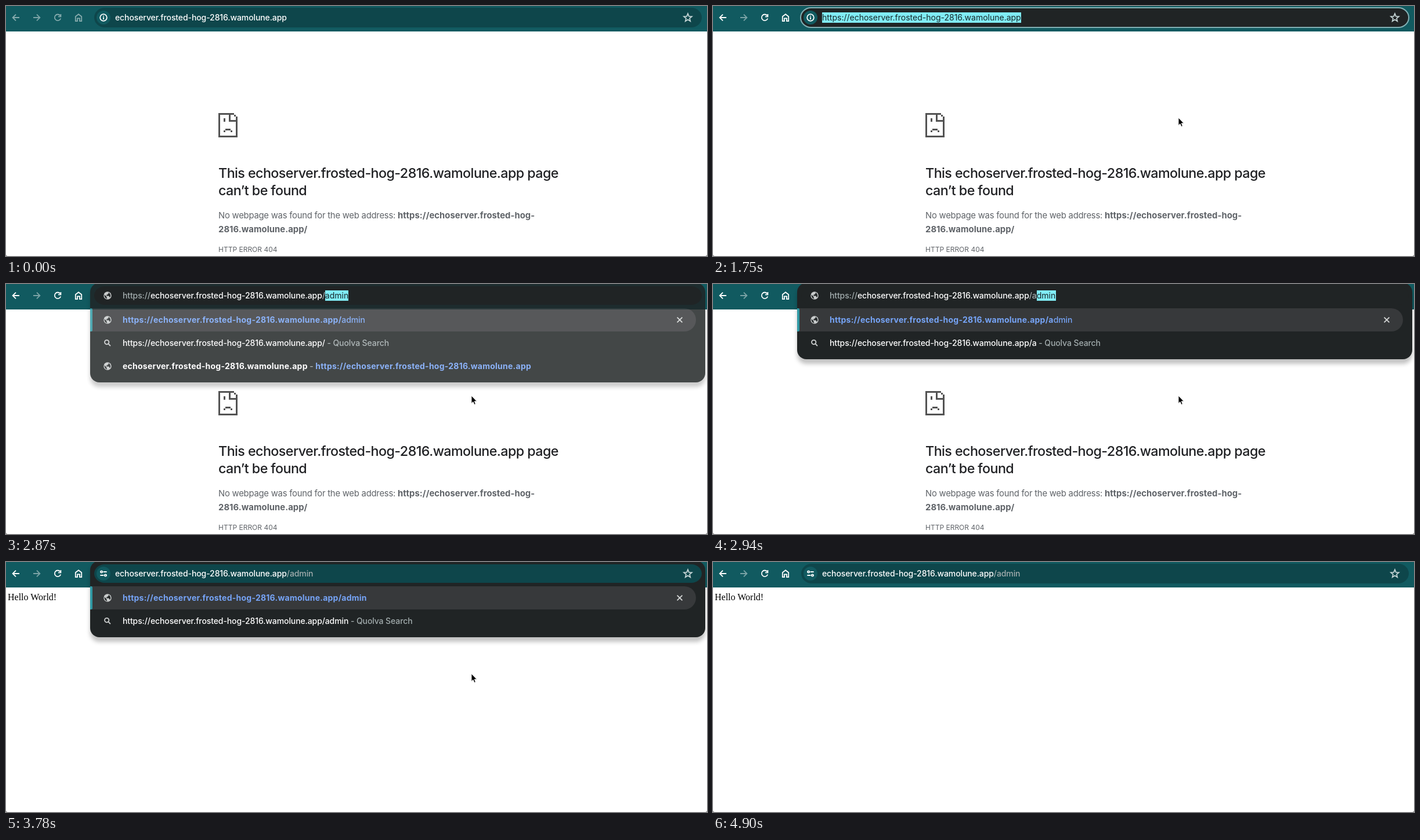
An HTML page that plays this animation: 1208 px wide and 432 px high, repeating every 6.65 s.

```html
<!DOCTYPE html>
<html lang="en">
<head>
<meta charset="utf-8">
<title>Address bar</title>
<style>
  html, body { margin: 0; width: 100%; height: 100%; overflow: hidden; background: #fff; }
  svg { display: block; width: 1208px; height: 432px; }
  text { font-family: Inter, sans-serif; font-optical-sizing: none; font-feature-settings: "calt" 0; white-space: pre; }
  .ui { font-size: 14px; font-weight: 500; letter-spacing: -.1px; fill: #fff; }
  .dim { fill: #a3adae; }
  .blue { fill: #76a4f7; }
  .bold { font-weight: 700; letter-spacing: .24px; }
  .sel { fill: #16282a; font-weight: 400; letter-spacing: 0; }
  .title { font-size: 23.3px; font-weight: 500; letter-spacing: -.58px; fill: #202124; }
  .body { font-size: 14.8px; letter-spacing: -.22px; fill: #5f6368; }
  .body .bold { letter-spacing: .06px; }
  .code { font-size: 12px; fill: #5f6368; }
  .hello { font: 16px "Liberation Serif", serif; fill: #000; }
  .line { fill: none; stroke-width: 1.8; }
  #panel { filter: drop-shadow(0 8px 3.5px rgba(0, 0, 0, .24)); }
</style>
</head>
<body>
<svg viewBox="0 0 1208 432">
  <defs>
    <g id="globe">
      <circle r="6.7" fill="#c9cccc"/>
      <path d="M-5.2-1.5L-1.6 2v1.2L-.6 5.4C-4 5-5.8 2-5.2-1.5ZM1.6-5.2C4.5-4 5.8-1 5 2L3.6 3.2 2.6.8-1.8.4V-1.4H.2V-3H1.6Z" fill="#25292a"/>
    </g>
    <g id="info" class="line" stroke="#fff" stroke-width="1.5">
      <circle r="5.8"/><path d="M0-.8V3.2M0-3.2V-1.8"/>
    </g>
    <g id="tune" class="line" stroke="#fff" stroke-width="1.5">
      <path d="M-.2-3H5.6M-5.6 3H.2"/><circle cx="-3.4" cy="-3" r="1.7"/><circle cx="3.4" cy="3" r="1.7"/>
    </g>
  </defs>
  <rect width="1208" height="432" fill="#fff"/>
  <g id="error">
    <path id="sad" fill="#535353"/>
    <text id="title1" class="title" x="366" y="297"></text>
    <text class="title" x="366" y="327">can’t be found</text>
    <text id="body1" class="body" x="366" y="367"></text>
    <text id="body2" class="body" x="366" y="391"></text>
    <text class="code" x="366" y="425">HTTP ERROR 404</text>
  </g>
  <text id="hello" class="hello" x="3" y="66">Hello World!</text>
  <path d="M0 429V432H3Q0 432 0 429ZM1208 429V432H1205Q1208 432 1208 429Z" fill="#777"/>

  <rect width="1208" height="44" fill="#115a60"/>
  <g id="nav" class="line">
    <path d="M23 20H12M17 14.6L11.6 20L17 25.4"/>
    <path d="M47 20H58M53 14.6L58.4 20L53 25.4" stroke="#7ba3a6"/>
    <path d="M93.2 16.4A5.3 5.3 0 1 0 94.2 21.4M94.4 14V18.4H90"/>
    <path d="M119.8 18.2L125 14.2L130.2 18.2V26.2H127V21.4H123V26.2H119.8Z"/>
  </g>

  <g id="popup">
    <rect id="panel" x="145" y="-2" width="1060" rx="16" fill="#202425"/>
    <path d="M145 42H1169A20 20 0 0 1 1169 82H145Z" fill="#37393b"/>
    <path d="M145 42H147Q149 42 149 44V80Q149 82 147 82H145Z" fill="#3099a4"/>
    <path d="M1156.6 57.6L1165.4 66.4M1165.4 57.6L1156.6 66.4" class="line" stroke="#d4d6d6"/>
    <use href="#globe" x="175" y="62"/>
    <path d="M176.6 103.6L180 107M177.4 100.6A3.7 3.7 0 1 1 170 100.6A3.7 3.7 0 1 1 177.4 100.6" class="line" stroke="#c9cccc"/>
    <text id="row1" class="ui blue" x="201" y="67"></text>
    <text id="row2" class="ui" x="201" y="107"></text>
    <g id="recent">
      <use href="#globe" x="175" y="142"/>
      <text id="row3" class="ui" x="201" y="147"></text>
    </g>
  </g>

  <rect id="pill" rx="18"/>
  <circle id="badge" cx="168" cy="20" r="12" fill="#115a60"/>
  <use id="site"/>
  <path id="star" class="line" stroke="#c3d3d4" stroke-width="1.5"/>
  <rect id="mark" y="11" height="18" fill="#80ecf6"/>
  <text id="address" class="ui" y="25"></text>
  <rect id="caret" y="11" width="1" height="17" fill="#fff"/>
  <path id="cursor" d="M802 193V206.4L805 203.6L807 208.4L809.3 207.4L807.3 202.8H811.4Z" fill="#000" stroke="#fff" stroke-width=".9"/>
</svg>
<script>
const LOOP = 6650;
const HOST = 'echoserver.frosted-hog-2816.wamolune.app';
const SITE = 'https://' + HOST;
const WORD = 'admin';
const KEYS = [2940, 3080, 3150, 3290, 3430];

const $ = id => document.getElementById(id);
const span = (cls, s) => `<tspan class="${cls}">${s}</tspan>`;
const show = (id, on) => $(id).setAttribute('visibility', on ? 'visible' : 'hidden');
const set = (id, attrs) => {
  for (const k in attrs) $(id).setAttribute(k, attrs[k]);
};
const write = (id, html) => {
  const el = $(id);
  if (el.markup !== html) el.innerHTML = el.markup = html;
};

function drawStatic() {
  // Unit cells: x, y, width, height
  const cells = ['0 0 9 1', '0 1 1 12', '0 13 11 1', '10 2 1 11', '9 1 1 1', '6 1 1 4',
    '7 4 3 1', '3 3 1 2', '4 9 3 1', '3 10 1 1', '7 10 1 1'];
  set('sad', { d: cells.map(c => {
    const [x, y, w, h] = c.split(' ').map(n => n * 3);
    return `M${366 + x} ${185 + y}h${w}v${h}h${-w}z`;
  }).join('') });

  const tips = Array.from({ length: 10 }, (_, i) => {
    const a = i * Math.PI / 5, r = i % 2 ? 3.2 : 7.2;
    return `${1175 + r * Math.sin(a)} ${20.4 - r * Math.cos(a)}`;
  });
  set('star', { d: `M${tips.join('L')}Z` });

  const cut = HOST.lastIndexOf('-') + 1;
  write('title1', `This ${HOST} page`);
  write('body1', 'No webpage was found for the web address: ' + span('bold', 'https://' + HOST.slice(0, cut)));
  write('body2', span('bold', HOST.slice(cut) + '/'));
  write('row3', span('bold', HOST) + span('dim', ' - ') + span('blue bold', SITE));
}

function addressText(t, typed) {
  if (t < 1750) return HOST;
  if (t < 2100) return span('sel', SITE);
  if (t < 2870) return span('dim', 'https://') + HOST;
  if (t < 3780) {
    return span('dim', 'https://') + HOST + span('dim', '/' + typed) + span('sel', WORD.slice(typed.length));
  }
  return HOST + span('dim', '/' + WORD);
}

function render(t) {
  const focused = t >= 1750 && t < 2870;
  const typing = t >= 2870 && t < 3780;
  const loaded = t >= 3780;
  const typed = WORD.slice(0, KEYS.filter(k => t >= k).length);

  show('error', !loaded);
  show('hello', loaded);
  set('nav', { stroke: t < 700 ? '#86abad' : '#fff' });

  // Popup fades in over one step and out over two
  const fade = t < 2870 ? 0 : t < 2940 ? .84 : t < 3850 ? 1 : t < 3920 ? .5 : 0;
  set('popup', { opacity: fade });
  set('panel', { height: t < 2940 ? 172 : 132 });
  $('recent').style.display = t < 2940 ? '' : 'none';
  write('row1', span('bold', SITE + '/' + typed) + WORD.slice(typed.length));
  write('row2', `${SITE}/${typed}` + span('dim', ' - Quolva Search'));

  const dark = focused || typing;
  const inset = fade ? 4 : 3;
  set('pill', {
    x: focused ? 151 : 152, width: focused ? 1048 : 1047,
    y: inset, height: 40 - 2 * inset,
    fill: dark ? '#202425' : '#0e464b',
    stroke: focused ? '#83b0b4' : 'none', 'stroke-width': 2
  });
  show('badge', !typing);
  show('star', !typing);
  set('site', {
    href: typing ? '#globe' : loaded ? '#tune' : '#info',
    x: typing ? 175 : 168, y: 20
  });

  const left = typing ? 201 : 188;
  set('address', { x: left });
  write('address', addressText(t, typed));
  const text = $('address');
  const chosen = text.querySelector('.sel');
  const rest = chosen ? chosen.textContent.length : 0;
  const total = text.getComputedTextLength();
  const tail = rest ? chosen.getComputedTextLength() : 0;
  show('mark', rest > 0);
  set('mark', { x: Math.round(left + total - tail), width: Math.round(tail) });
  show('caret', (t >= 2100 && t < 2660) || (t >= 3430 && t < 3780));
  set('caret', { x: Math.round(left + total) });

  set('cursor', { opacity: t < 1050 || t >= 4900 ? 0 : t < 4830 ? 1 : .5 });
}

drawStatic();
const start = performance.now();
function tick() {
  render((performance.now() - start) % LOOP);
  requestAnimationFrame(tick);
}
tick();
</script>
</body>
</html>
```
